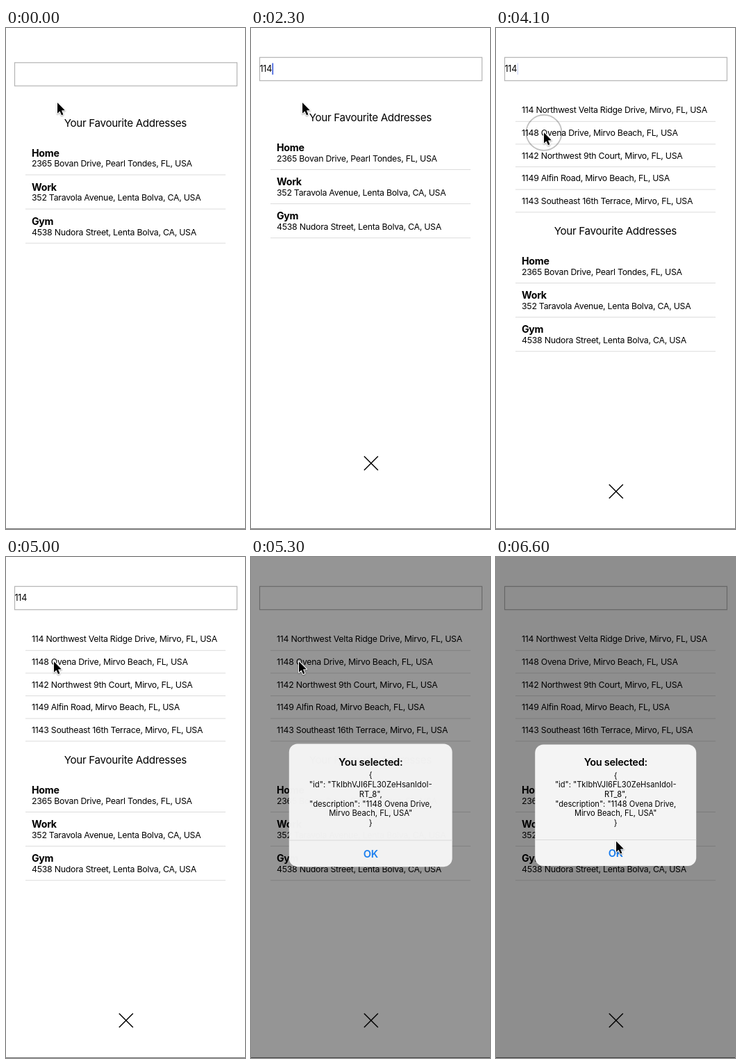
These frames come from a looping animation (344 by 720 pixels, 6.7 s). An HTML page with a canvas:

```html
<!DOCTYPE html>
<html lang="en">
<head>
<meta charset="utf-8">
<title>Address search</title>
<style>
  html, body { margin: 0; width: 100%; height: 100%; overflow: hidden; background: #fff; }
  canvas { display: block; width: 344px; height: 720px; }
</style>
</head>
<body>
<canvas id="stage"></canvas>
<script>
const W = 344, H = 720, LOOP = 6700, STEP = 100;
const canvas = document.getElementById('stage');
const ctx = canvas.getContext('2d');
const ratio = window.devicePixelRatio || 1;
canvas.width = W * ratio;
canvas.height = H * ratio;

const FAMILY = 'Inter, "Liberation Sans", sans-serif';
const ROW = 32.6, FAVOURITE = 49.1;

const results = [
  '114 Northwest Velta Ridge Drive, Mirvo, FL, USA',
  '1148 Ovena Drive, Mirvo Beach, FL, USA',
  '1142 Northwest 9th Court, Mirvo, FL, USA',
  '1149 Alfin Road, Mirvo Beach, FL, USA',
  '1143 Southeast 16th Terrace, Mirvo, FL, USA'
];
const favourites = [
  ['Home', '2365 Bovan Drive, Pearl Tondes, FL, USA'],
  ['Work', '352 Taravola Avenue, Lenta Bolva, CA, USA'],
  ['Gym', '4538 Nudora Street, Lenta Bolva, CA, USA']
];
const message = [
  '{',
  '"id": "TkIbhVJI6FL30ZeHsanIdoI-',
  'RT_8",',
  '"description": "1148 Ovena Drive,',
  'Mirvo Beach, FL, USA"',
  '}'
];

// Each entry is [start time, value]; a value holds until the next entry.
const typed = [[0, ''], [1500, '1'], [1600, '11'], [2100, '114'], [5200, '']];
const caretAlpha = [
  [0, 0], [200, 1],
  [800, .7], [900, .3], [1000, 0], [1200, .5], [1300, 1],
  [1900, .7], [2000, .3], [2100, 0], [2200, .5], [2300, 1],
  [2900, .7], [3000, .3], [3100, 0], [3400, .5], [3500, 1],
  [3900, .8], [4000, .5], [4100, .2], [4200, 0], [4400, .5], [4500, 0]
];
const ringAlpha = [[0, 0], [4100, .25], [4200, .45], [4400, .2], [4500, 0], [4900, .45], [5000, 0]];

function valueAt(track, t) {
  let value = track[0][1];
  for (const [start, v] of track) if (t >= start) value = v;
  return value;
}

function ease(t, from, to) {
  const p = Math.min(1, Math.max(0, (t - from) / (to - from)));
  return p * p * (3 - 2 * p);
}

const mix = (a, b, p) => a + (b - a) * p;

function text(str, x, y, size, { weight = 400, align = 'left', color = '#000', tracking = -.02 } = {}) {
  ctx.font = `${weight} ${size}px ${FAMILY}`;
  ctx.letterSpacing = `${size * tracking}px`;
  ctx.textAlign = align;
  ctx.fillStyle = color;
  ctx.fillText(str, x, y);
}

function rule(x1, x2, y, color) {
  ctx.fillStyle = color;
  ctx.fillRect(x1, y - .5, x2 - x1, 1);
}

function drawInput(t, shift) {
  ctx.strokeStyle = '#b4b4b4';
  ctx.lineWidth = 1.2;
  ctx.strokeRect(12.5, 42.3 + shift, 320, 33.4);

  const value = valueAt(typed, t);
  text(value, 12.5, 63.2, 12.6);
  ctx.globalAlpha = valueAt(caretAlpha, t);
  ctx.fillStyle = '#3f5fdc';
  ctx.fillRect(12.8 + ctx.measureText(value).width, 50.5, 1.7, 16.5);
  ctx.globalAlpha = 1;
}

function drawResults() {
  results.forEach((line, i) => {
    text(line, 37, 122.3 + i * ROW, 12.3);
    rule(28, 316, 134.3 + i * ROW, '#dcdcdc');
  });
}

function drawFavourites(shift) {
  text('Your Favourite Addresses', 171.8, 134 + shift, 15.12, { align: 'center' });
  favourites.forEach(([name, address], i) => {
    const y = shift + i * FAVOURITE;
    text(name, 37, 177 + y, 14.2, { weight: 700 });
    text(address, 37, 191.8 + y, 12.3);
    rule(28, 316, 203.5 + y, '#dcdcdc');
  });
}

function drawClose(y) {
  ctx.strokeStyle = '#000';
  ctx.lineWidth = 1.5;
  ctx.beginPath();
  ctx.moveTo(162.8, y - 10);
  ctx.lineTo(182.8, y + 10);
  ctx.moveTo(182.8, y - 10);
  ctx.lineTo(162.8, y + 10);
  ctx.stroke();
}

function drawAlert(t) {
  // Critically damped spring; the panel turns opaque a little sooner
  const s = .0328 * (t - 5163);
  const rest = (1 + s) * Math.exp(-s);
  ctx.fillStyle = `rgba(0, 0, 0, ${.443 * (1 - rest)})`;
  ctx.fillRect(0, 0, W, H);

  ctx.save();
  ctx.globalAlpha = 1 - rest ** 1.4;
  ctx.translate(172.2, 356.8);
  ctx.scale(1 + .2 * rest, 1 + .2 * rest);
  ctx.fillStyle = '#f4f4f4';
  ctx.beginPath();
  ctx.roundRect(-116, -87.3, 232, 174.6, 12);
  ctx.fill();
  text('You selected:', 0, -56.6, 14.5, { weight: 600, align: 'center' });
  message.forEach((line, i) => {
    text(line, 0, -39.3 + i * 13.7, 11.1, { align: 'center', tracking: 0 });
  });
  rule(-116, 116, 49.7, '#dadada');
  text('OK', 0, 74.5, 14.5, { weight: 600, align: 'center', color: '#167cf0' });
  ctx.restore();
}

function pointerAt(t) {
  if (t >= 6600) return [173, 408.5];
  const down = ease(t, 3300, 4000);
  const across = ease(t, 5800, 6500);
  return [
    mix(mix(74, 69, down), 165, across),
    mix(mix(107.2, 150.3, down), 407.5, across)
  ];
}

const arrow = [[0, 0], [0, 15.5], [3.5, 12.3], [6, 18], [8.4, 17], [6, 11.3], [10.8, 11]];

function drawPointer(t) {
  const [x, y] = pointerAt(t);
  const ring = valueAt(ringAlpha, t);
  if (ring) {
    ctx.strokeStyle = `rgba(0, 0, 0, ${ring})`;
    ctx.lineWidth = 1.8;
    ctx.beginPath();
    ctx.arc(x, y, 25.5, 0, 2 * Math.PI);
    ctx.stroke();
  }
  ctx.save();
  ctx.translate(x, y);
  ctx.beginPath();
  arrow.forEach(([ax, ay]) => ctx.lineTo(ax, ay));
  ctx.closePath();
  ctx.lineJoin = 'round';
  ctx.lineWidth = 2;
  ctx.strokeStyle = '#fff';
  ctx.shadowColor = 'rgba(0, 0, 0, .35)';
  ctx.shadowBlur = 2 * ratio;
  ctx.shadowOffsetY = ratio;
  ctx.stroke();
  ctx.shadowColor = 'transparent';
  ctx.fillStyle = '#000';
  ctx.fill();
  ctx.restore();
}

function draw(t) {
  const focused = t >= 200;
  const listed = t >= 2500;
  const shift = focused ? 0 : 7.5;
  ctx.setTransform(ratio, 0, 0, ratio, 0, 0);
  ctx.fillStyle = '#fff';
  ctx.fillRect(0, 0, W, H);

  drawInput(t, shift);
  if (listed) drawResults();
  drawFavourites(listed ? 5 * ROW : shift);
  if (focused) drawClose(listed ? 666 : 625.5);
  rule(0, W, 719.5, '#777');
  if (t >= 5200) drawAlert(t);
  drawPointer(t);
}

const begin = performance.now();

function tick() {
  const t = (performance.now() - begin) % LOOP;
  draw(Math.floor(t / STEP) * STEP);
  requestAnimationFrame(tick);
}
tick();
</script>
</body>
</html>
```
